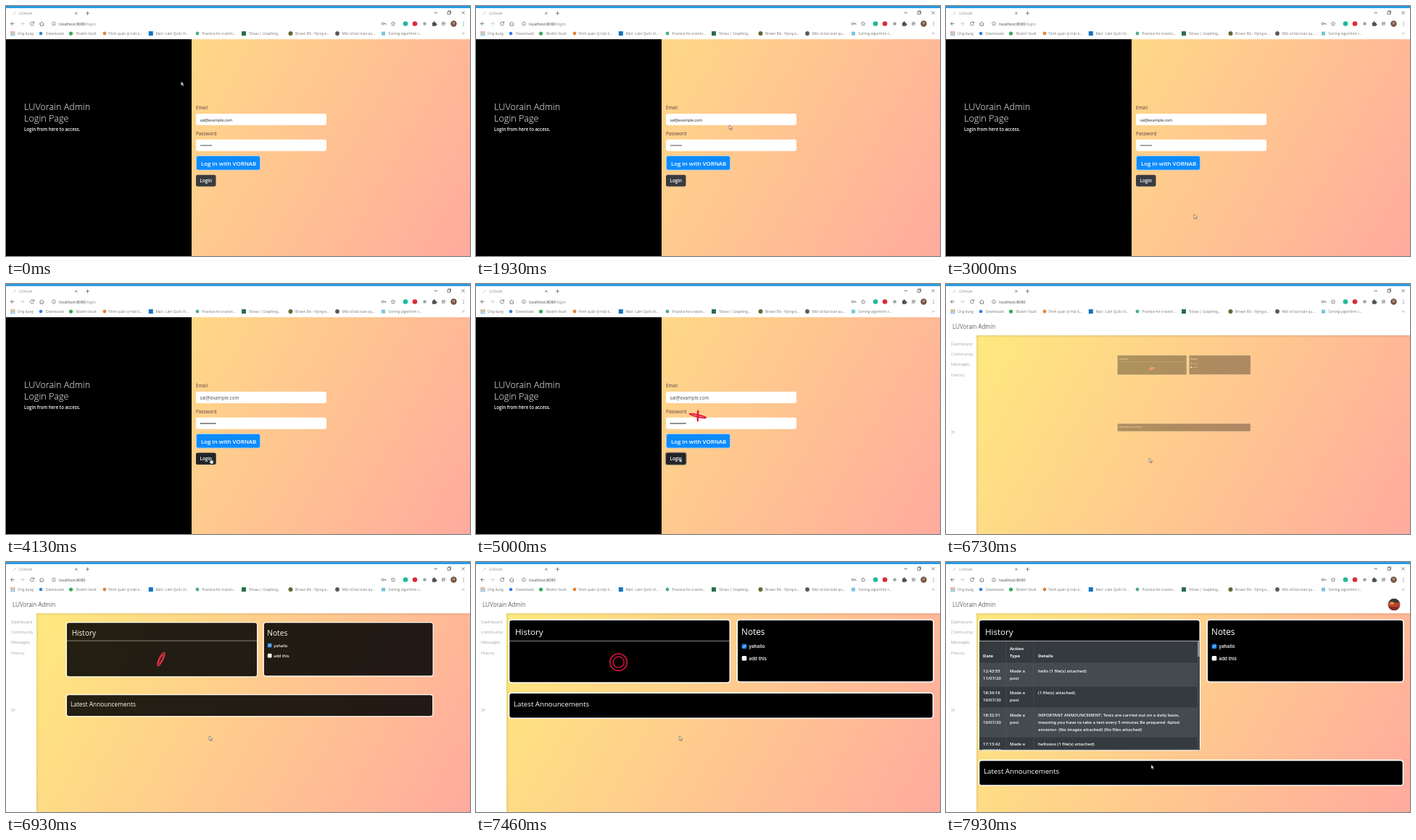
Write an HTML page that moves like this. It is 640x346 px and loops after 8000 ms.

```html
<!DOCTYPE html>
<html lang="en">
<head>
<meta charset="utf-8">
<title>LUVorain</title>
<style>
@property --size { syntax: "<number>"; inherits: false; initial-value: 1; }
@property --turn { syntax: "<angle>"; inherits: true; initial-value: 0deg; }

html, body { margin: 0; width: 100%; height: 100%; overflow: hidden; }
.stage {
  position: relative; width: 640px; height: 346px; overflow: hidden; background: #fff;
  font-family: "Open Sans", "Noto Sans", sans-serif;
}
.stage > * { position: absolute; left: 0; top: 0; width: 640px; height: 346px; }
.stage > .sky { top: 46px; height: 300px; background: linear-gradient(120deg, #ffee7c, #ffaa9e); }
svg { display: block; overflow: hidden; }

.light { font-weight: 300; }
.mid { font-weight: 500; }
.semi { font-weight: 600; }
.white { fill: #fff; }
.marks text { font-size: 4.8px; fill: #777; }
.icons { fill: none; stroke: #5f6368; stroke-width: .8; }
.label { font-size: 6.3px; fill: #5c3c46; }
.dots { stroke: #222; stroke-linecap: round; }
.nav text { font-size: 5.9px; font-weight: 300; fill: #777; }
.card { fill: #000; stroke: #fff; stroke-width: 1.6; }
.table text { font-size: 5.95px; font-weight: 600; fill: #fff; }
.table .head text { font-weight: 700; }

/* hard switches */
.old, .fresh, .path, .login, .dash, .wait, .done, .hover, .focus, .arrow, .hand, .drop {
  animation: 8s step-end infinite;
}
.old { animation-name: old; }
.fresh { animation-name: fresh; }
.path { animation-name: path; }
.login { animation-name: login; }
.dash { animation-name: dash; }
.wait { animation-name: wait; }
.done { animation-name: done; }
.hover { animation-name: hover; }
.focus { animation-name: focus; }
.arrow { animation-name: arrow; }
.hand { animation-name: hand; }
.drop { animation-name: drop; }
@keyframes old { 0% { visibility: visible } 51.5%, 100% { visibility: hidden } }
@keyframes fresh { 0% { visibility: hidden } 51.5% { visibility: visible } 80%, 100% { visibility: hidden } }
@keyframes path { 0% { visibility: visible } 77.5%, 100% { visibility: hidden } }
@keyframes login { 0% { visibility: visible } 80%, 100% { visibility: hidden } }
@keyframes dash { 0% { visibility: hidden } 80%, 100% { visibility: visible } }
@keyframes wait { 0% { visibility: hidden } 80% { visibility: visible } 96.6%, 100% { visibility: hidden } }
@keyframes done { 0% { visibility: hidden } 96.6%, 100% { visibility: visible } }
@keyframes hover { 0% { visibility: hidden } 41% { visibility: visible } 80%, 100% { visibility: hidden } }
@keyframes focus { 0% { visibility: hidden } 52.4% { visibility: visible } 80%, 100% { visibility: hidden } }
@keyframes arrow { 0% { visibility: visible } 41% { visibility: hidden } 55%, 100% { visibility: visible } }
@keyframes hand { 0% { visibility: hidden } 41% { visibility: visible } 55%, 100% { visibility: hidden } }
@keyframes drop { 0% { transform: none } 96.6%, 100% { transform: translateY(93.2px) } }

/* smooth motion */
.blur { animation: blur 8s linear infinite; }
@keyframes blur { 0%, 58.2% { filter: blur(0) } 62%, 100% { filter: blur(.65px) } }
.veil { animation: veil 8s linear infinite; }
@keyframes veil { 0%, 58.2% { opacity: 0 } 62%, 100% { opacity: 1 } }
.pop {
  transform-origin: 323.7px 107px; transform: scale(var(--size)); opacity: var(--size);
  animation: pop 8s infinite;
}
.pop.low { transform-origin: 323.7px 198.5px; }
@keyframes pop {
  0%, 82.7% { --size: 0; animation-timing-function: ease; }
  89.6%, 100% { --size: 1; }
}
.cursor { animation: cursor 8s linear infinite; }
@keyframes cursor {
  0%, .7% { transform: translate(241.5px, 104.5px) }
  2.5% { transform: translate(197.5px, 105px) }
  11.7% { transform: translate(197.5px, 105px); animation-timing-function: ease-in-out; }
  22.5% { transform: translate(349.5px, 165px) }
  28.2% { transform: translate(349.5px, 165px) }
  28.25%, 30.8% { transform: translate(449px, 226px) }
  33% { transform: translate(434px, 266px) }
  35.5% { transform: translate(388px, 294px) }
  38% { transform: translate(331px, 287px) }
  40% { transform: translate(295px, 259px) }
  41.6%, 95% { transform: translate(280.5px, 241px) }
  98.8%, 100% { transform: translate(283px, 280.5px) }
}

/* two rings tumbling in space, seen flat: tilt about x, then about y */
.ring { fill: none; stroke: #e2143f; animation: turn 1.6s linear -540ms infinite; }
.ring circle {
  vector-effect: non-scaling-stroke;
  transform: matrix(cos(var(--b)), calc(sin(var(--a)) * sin(var(--b))), 0, cos(var(--a)), 0, 0);
}
.outer { --a: var(--turn); --b: calc(var(--turn) * -2); stroke-width: 1.6; }
.inner { --a: calc(var(--turn) * 2); --b: calc(var(--turn) * -1); stroke-width: 1.3; }
@keyframes turn { from { --turn: 0deg } to { --turn: 180deg } }
</style>
</head>
<body>
<div class="stage">
  <div class="sky"></div>

  <!-- login page -->
  <svg class="login" viewBox="0 0 640 346">
    <g class="blur">
      <rect y="46" width="256" height="300"/>
      <g class="white">
        <g class="light" font-size="12.6">
          <text x="25" y="144">LUVorain Admin</text>
          <text x="25" y="160">Login Page</text>
        </g>
        <text class="semi" x="25" y="173.3" font-size="6.15">Login from here to access.</text>
      </g>
      <text class="label" x="262" y="143.2">Email</text>
      <text class="label" x="262" y="179.2">Password</text>
      <g class="white">
        <rect x="262" y="149" width="180" height="16" rx="2.4"/>
        <rect x="262" y="184.7" width="180" height="16" rx="2.4"/>
      </g>
      <g class="old">
        <text x="267.5" y="159.6" font-size="5.3" fill="#222">sal@example.com</text>
        <path class="dots" d="M269 193H283.5" stroke-width="1.5" stroke-dasharray="0 2"/>
      </g>
      <g class="fresh">
        <text x="267.5" y="159.6" font-size="6.4" fill="#495057">sal@example.com</text>
        <path class="dots" d="M269 193H289" stroke-width="1.8" stroke-dasharray="0 2.75"/>
      </g>
      <rect x="262.5" y="207.5" width="88" height="19.5" rx="2.6" fill="#0d8bfd" stroke="#a8cdea" stroke-width=".9"/>
      <text class="white semi" x="269" y="220.7" font-size="7.9">Log in with VORNAB</text>
      <rect x="262" y="233.7" width="27.5" height="16" rx="2.2" fill="#3a3b41"/>
      <rect class="hover" x="262" y="233.7" width="27.5" height="16" rx="2.2" fill="#23242a"/>
      <rect class="focus" x="261.4" y="233.1" width="28.7" height="17.2" rx="2.8" fill="none" stroke="#5a6268" stroke-opacity=".5" stroke-width="1.3"/>
      <text class="white semi" x="267.5" y="244.3" font-size="6.3">Login</text>
    </g>
    <g class="veil">
      <g transform="translate(306 182.5)">
        <g class="ring"><circle class="outer" r="11.7"/><circle class="inner" r="7.5"/></g>
      </g>
    </g>
  </svg>

  <!-- dashboard -->
  <svg class="dash" viewBox="0 0 640 346">
    <g fill="#fff" style="filter: drop-shadow(0 0 2px rgba(0,0,0,.18))">
      <path d="M0 40H640V71H42V346H0Z"/>
    </g>
    <text class="light" x="9" y="62" font-size="8.2" fill="#111">LUVorain Admin</text>
    <g class="nav">
      <text x="7" y="84.5">Dashboard</text>
      <text x="7" y="99">Community</text>
      <text x="7" y="113.2">Messages</text>
      <text x="7" y="127.5">History</text>
    </g>
    <path d="M7.3 202.8l2.2 2.2-2.2 2.2M10 202.8l2.2 2.2-2.2 2.2" fill="none" stroke="#888" stroke-width=".6"/>
    <g class="done">
      <clipPath id="face"><circle cx="618" cy="58.8" r="8.3"/></clipPath>
      <g clip-path="url(#face)">
        <rect x="609" y="50" width="18" height="18" fill="#3c3530"/>
        <rect x="609" y="56" width="18" height="6" fill="#b8432c"/>
        <rect x="609" y="62" width="18" height="6" fill="#8a2a22"/>
        <ellipse cx="615" cy="57" rx="3" ry="2" fill="#dc8a4a"/>
      </g>
    </g>

    <g class="pop">
      <g class="wait">
        <rect class="card" x="45.5" y="80" width="304.8" height="87" rx="4"/>
        <path d="M46 109.3H350" stroke="#b0b0b0" stroke-width=".8"/>
        <g transform="translate(196.6 138.7)">
          <g class="ring"><circle class="outer" r="11.7"/><circle class="inner" r="7.5"/></g>
        </g>
      </g>
      <g class="done">
        <rect class="card" x="45.5" y="80" width="304.8" height="180.4" rx="4"/>
        <clipPath id="pane"><rect x="46" y="109.2" width="304" height="151"/></clipPath>
        <g class="table" clip-path="url(#pane)">
          <rect x="46" y="109" width="304" height="152" fill="#343a3e"/>
          <path d="M46 140H347V172H46ZM46 202H347V242H46Z" fill="#434a50"/>
          <path d="M83 109V261M121 109V261M46 140H347M46 172H347M46 202H347M46 242H347" stroke="#4d555b" stroke-width=".6"/>
          <g class="head">
            <text x="51" y="132.3">Date</text>
            <text x="88" y="122.3">Action</text><text x="88" y="132.3">Type</text>
            <text x="127" y="132.3">Details</text>
          </g>
          <text x="51" y="153.2">12:43:55</text><text x="51" y="163.2">11/07/20</text>
          <text x="88" y="153.2">Made a</text><text x="88" y="163.2">post</text>
          <text x="127" y="153.2">hello (1 file(s) attached)</text>
          <text x="51" y="183.4">18:34:16</text><text x="51" y="193.4">10/07/20</text>
          <text x="88" y="183.4">Made a</text><text x="88" y="193.4">post</text>
          <text x="127" y="183.4">(1 file(s) attached)</text>
          <text x="51" y="213.6">18:32:31</text><text x="51" y="223.6">10/07/20</text>
          <text x="88" y="213.6">Made a</text><text x="88" y="223.6">post</text>
          <text x="127" y="213.6">IMPORTANT ANNOUNCEMENT: Tests are carried out on a daily basis,</text>
          <text x="127" y="223.6">meaning you have to take a test every 5 minutes Be prepared -6plod</text>
          <text x="127" y="233.6">ancestor- (No images attached) (No files attached)</text>
          <text x="51" y="253.8">17:13:42</text><text x="51" y="263.4">10/07/20</text>
          <text x="88" y="253.8">Made a</text><text x="88" y="263.4">post</text>
          <text x="127" y="253.8">helloooo (1 file(s) attached)</text>
          <rect x="346.6" y="109" width="3.4" height="152" fill="#42474b"/>
          <rect x="347" y="110" width="2.8" height="21" fill="#8d9194"/>
        </g>
        <path d="M46 109.3H350M46 260.3H350" stroke="#d8d8d8" stroke-width=".8"/>
      </g>
      <rect class="card" x="360.2" y="80" width="270.8" height="86" rx="4"/>
      <g class="white mid">
        <text x="54" y="101" font-size="11.6">History</text>
        <text x="366" y="101" font-size="11.8">Notes</text>
        <g class="semi" font-size="6.3">
          <text x="376.5" y="119.2">yahallo</text>
          <text x="376.5" y="135.9">add this</text>
        </g>
        <rect x="366.7" y="130" width="6.6" height="6.6" rx="1.5"/>
      </g>
      <rect x="366.7" y="113.4" width="6.6" height="6.6" rx="1.5" fill="#1a86f5"/>
      <path d="M368.3 116.8l1.2 1.2 2.2-2.6" fill="none" stroke="#fff" stroke-width=".9"/>
    </g>

    <g class="drop">
      <g class="pop low">
        <rect class="card" x="45.5" y="181.2" width="585" height="35" rx="4"/>
        <text class="white mid" x="52" y="199.8" font-size="9.7">Latest Announcements</text>
      </g>
    </g>
  </svg>

  <!-- browser frame -->
  <svg viewBox="0 0 640 346">
    <rect width="640" height="46" fill="#fff"/>
    <rect width="640" height="3" fill="#2b9be2"/>
    <path d="M9.5 12l4-3.4" stroke="#aaa" stroke-width=".7"/>
    <text x="18" y="11.8" font-size="4.4" fill="#888">LUVorain</text>
    <g class="icons">
      <path d="M95.3 8.6l3 3m0-3l-3 3M110 10h5M112.5 7.5v5M590.5 9.5h4.5M609 7.8h3.6v3.6h-3.6zM610 7.8v-1h3.6v3.6h-1M628.6 7.4l4 4m0-4l-4 4"/>
      <path d="M11.5 24.5H6.5m2.4-2.4L6.5 24.5l2.4 2.4"/>
      <path d="M20 24.5h5m-2.4-2.4l2.4 2.4-2.4 2.4" stroke="#c4c7c9"/>
      <path d="M38.2 23.2a2.5 2.5 0 1 0 .2 2M38.6 21.6v2h-2"/>
      <path d="M46.3 24.7l3-2.7 3 2.7M47.2 24.2v3h4.2v-3"/>
      <circle cx="66" cy="24.5" r="2.5" stroke-width=".6"/>
      <path d="M66 24.2v1.7M66 22.9v.6" stroke-width=".7"/>
      <circle cx="519.6" cy="24.5" r="1.5"/><path d="M521 24.5h3v1.4"/>
      <path d="M534 21.7l.8 1.9 2.1.2-1.6 1.4.5 2-1.8-1.1-1.8 1.1.5-2-1.6-1.4 2.1-.2z" stroke-width=".6"/>
      <path d="M601 22.8h5M601 24.5h5M601 26.2h2.8M605 25.6v1.4"/>
    </g>
    <circle cx="551" cy="24.5" r="3.3" fill="#1fb89a"/>
    <circle cx="564" cy="24.5" r="3.3" fill="#d92c36"/>
    <circle cx="577.5" cy="24.5" r="2.3" fill="#9aa6a2"/>
    <path d="M588 23h1.5a1.2 1.2 0 1 1 2.2 0h1.3v1.5a1.1 1.1 0 1 1 0 2v1.3h-5z" fill="#4d5156"/>
    <circle cx="617.5" cy="24.5" r="4.2" fill="#76513f"/>
    <text class="white" x="615.8" y="26.3" font-size="4.8">H</text>
    <path d="M631 22.3v4.8" stroke="#5f6368" stroke-width="1.2" stroke-linecap="round" stroke-dasharray="0 2.2"/>
    <g font-size="5.45">
      <text x="73" y="26.5" fill="#444">localhost:8080</text>
      <text class="path" x="109.6" y="26.5" fill="#888">/login</text>
    </g>
    <g stroke-width="1.4" stroke-dasharray="1.4 .8">
      <path d="M6.5 36h5.8" stroke="#d9604c"/>
      <path d="M6.5 38.2h5.8" stroke="#4c9a5a"/>
      <path d="M6.5 40.4h5.8" stroke="#4a7fd0"/>
    </g>
    <circle cx="48" cy="38" r="2.3" fill="#2f7de0"/>
    <circle cx="89.5" cy="38" r="2.6" fill="#35a853"/>
    <circle cx="136" cy="38" r="2.4" fill="#e2853c"/>
    <rect x="196.8" y="35" width="6" height="6" fill="#1673c4"/>
    <circle cx="264" cy="38" r="2.4" fill="#4fae84"/>
    <rect x="325" y="35" width="6" height="6" fill="#2c6e49"/>
    <circle cx="392.5" cy="38" r="3" fill="#5f6b35"/>
    <circle cx="457" cy="38" r="2.9" fill="#55595e"/>
    <rect x="518" y="35.6" width="5" height="5" fill="#79c3dc"/>
    <g class="marks">
      <text x="16" y="39.8">Ứng dụng</text>
      <text x="55" y="39.8">Downloads</text>
      <text x="97" y="39.8">Bodrin Vault</text>
      <text x="141" y="39.8">Trình quản lý mật k...</text>
      <text x="206.5" y="39.8">Mail - Lâm Quốc Vi...</text>
      <text x="270.5" y="39.8">Practice for crackin...</text>
      <text x="335" y="39.8">Tolvax | Graphing...</text>
      <text x="399" y="39.8">Brown Elk - Flying e...</text>
      <text x="463.5" y="39.8">Một số bài toán qu...</text>
      <text x="527.5" y="39.8">Sorting algorithm r...</text>
    </g>
    <path d="M629.2 36.8l1.2 1.3-1.2 1.3M631 36.8l1.2 1.3-1.2 1.3" fill="none" stroke="#888" stroke-width=".6"/>
  </svg>

  <!-- pointer -->
  <svg viewBox="0 0 640 346">
    <g class="cursor">
      <path class="arrow" d="M0 0V5.8L1.4 4.6 2.3 6.7 3.3 6.3 2.4 4.2H4.2Z" fill="#fff" stroke="#222" stroke-width=".5"/>
      <path class="hand" d="M1.3 .2Q2 -.5 2.5 .3V3L5 3.5Q5.7 3.8 5.6 4.5L5.1 8H2L.1 5.3Q-.1 4.4 1.3 4.8Z" fill="#fff" stroke="#222" stroke-width=".5"/>
    </g>
  </svg>
</div>
</body>
</html>
```
